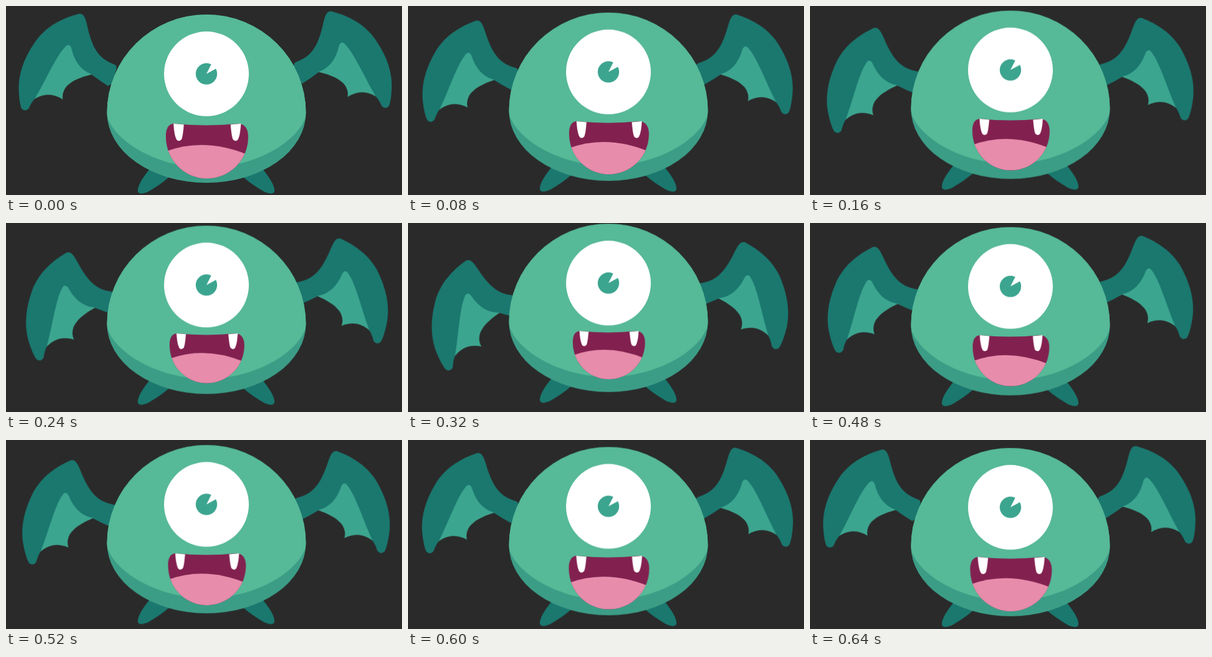
Recreate the animation shown at these times as an HTML page. Size 649x310 px, loop 680 ms.

```html
<!DOCTYPE html>
<html lang="en">
<head>
<meta charset="utf-8">
<title>Flying monster</title>
<style>
  html, body { margin: 0; width: 100%; height: 100%; overflow: hidden; background: #2a2a2a; }
  svg { display: block; width: 649px; height: 310px; }

  .monster, .wing, .mouth {
    transform-box: view-box;
    animation: 340ms linear -8ms infinite alternate;
  }
  .monster { animation-name: bob; }
  .wing { animation-name: flap; }
  .left { --up: .5deg; --down: -21.8deg; transform-origin: 274px 111px; }
  .right { --up: .3deg; --down: -14.2deg; transform-origin: 260px 112px; }
  .mouth { animation-name: shrink; transform-origin: 328px 168px; }

  @keyframes bob {
    from { transform: translateY(.3px); }
    to { transform: translateY(-13.2px); }
  }
  @keyframes flap {
    from { transform: rotate(var(--up)); }
    to { transform: rotate(var(--down)); }
  }
  @keyframes shrink {
    from { transform: scale(1.003); }
    to { transform: scale(.873); }
  }

  .dark { fill: #1a786f; }
  .mid { fill: #3ca58f; }
  .shade { fill: #3c9d86; }
  .skin { fill: #56b997; }
  .white { fill: #fff; }
</style>
</head>
<body>
<svg viewBox="0 0 649 310">
  <defs>
    <g id="wing">
      <path class="dark" d="M178 96 C151 86 142 68 134.500 38 C131 21 128 10 118.500 13 C96 19 69 30 49 57 C27 88 20 115 21 140 C21.500 152 23 163 25.500 168 Q31 174 37 168 Q42 157 47 152 L90 110 L115 112 L140 112 Q153 122 167 131 L174 127 L181 103 Q182 98 178 96Z"/>
      <path class="mid" d="M47 152 C62 128 82 82 97 67 Q103 60 107 68 C112 90 122 105 141 112 C116 118 90 128 93 153 Q70 138 47 152Z"/>
    </g>
    <path id="foot" class="dark" d="M240 262 C228 276 216 292 216 303 C217 310 226 308 234 304 C246 297 258 289 268 280Z"/>
    <path id="fang" class="white" d="M274.500 193 L291.500 194.500 C290.500 205 289.500 215 287.500 219 Q284 223 280 220 C276.500 215 275 203 274.500 193Z"/>
    <path id="lips" d="M276 193 Q327.500 198.500 380.500 193 C392 193 397 203 397 214 C397 254.500 365 283 329 283 C294 283 262 254.500 262 214 C262 203 265 193 276 193Z"/>
    <path id="torso" d="M165.500 175 A163 161 0 0 1 491.500 175 A163 115 0 0 1 165.500 175Z"/>
    <clipPath id="inMouth"><use href="#lips"/></clipPath>
    <clipPath id="inTorso"><use href="#torso"/></clipPath>
  </defs>

  <g class="monster">
    <use class="wing left" href="#wing"/>
    <g transform="matrix(-1 0 0 1 653 -4)"><use class="wing right" href="#wing"/></g>
    <use href="#foot"/>
    <use href="#foot" transform="matrix(-1 0 0 1 656 0)"/>

    <use class="shade" href="#torso"/>
    <path class="skin" clip-path="url(#inTorso)" d="M160 0 H497 V182 H491 C477 224 407 265 328.500 265 C250 265 180 224 166 182 H160Z"/>

    <circle class="white" cx="328.500" cy="111.300" r="69.500"/>
    <circle class="mid" cx="328.500" cy="111.300" r="17.500"/>
    <path class="white" d="M328.500 111.300 L337.500 93.500 L348 100.700Z"/>

    <g class="mouth">
      <use href="#lips" fill="#822150"/>
      <path clip-path="url(#inMouth)" fill="#e78cab" d="M261 239 Q325 215 396 244 V290 H261Z"/>
      <use href="#fang"/>
      <use href="#fang" transform="matrix(-1 0 0 1 659.500 0)"/>
    </g>
  </g>
</svg>
</body>
</html>
```
